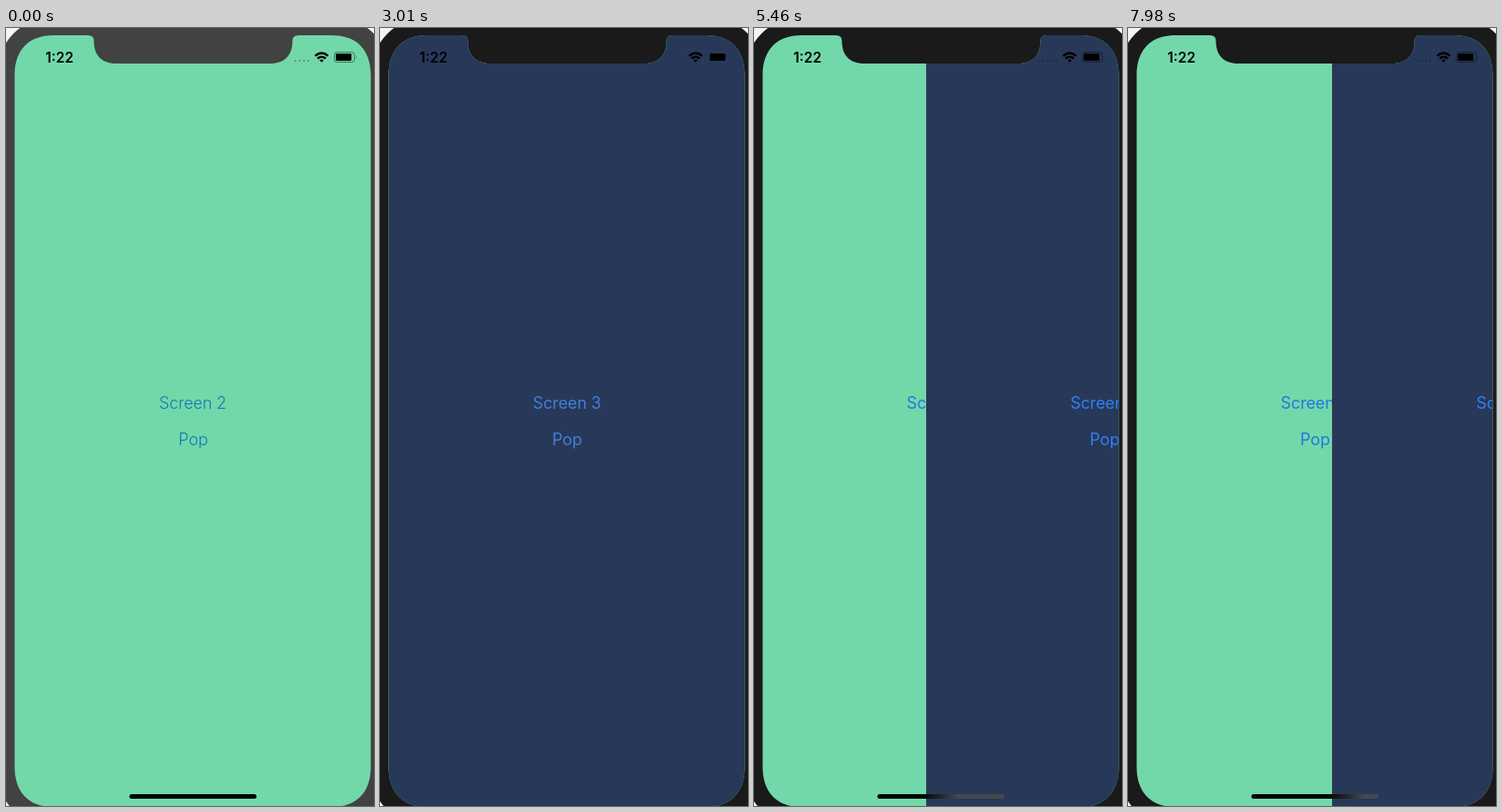
An HTML page for the animation above (8 s loop, 404 by 854 pixels).

```html
<!DOCTYPE html>
<html lang="en">
<head>
<meta charset="utf-8">
<title>Swipe between screens</title>
<style>
  html, body { margin: 0; width: 100%; height: 100%; overflow: hidden; background: #f4f4f4; }
  svg { display: block; width: 404px; height: 854px; }
  text { font-family: Inter, Roboto, sans-serif; }
  .label { font-size: 18px; letter-spacing: -.15px; text-anchor: middle; }
  #below { fill: #2478df; }
  #above { fill: #2f80f2; }
  #bezel { fill: #1a1a1a; }
  .rest #bezel { fill: #424242; }
  .rest #below { fill: #1878b4; font-weight: 300; }
  .dim #above { fill: #4080d8; }
  .dim #dots, .dim #bar { display: none; }
  .still #shell { display: none; }
</style>
</head>
<body>
<svg id="stage" viewBox="0 0 404 854">
  <defs>
    <clipPath id="screen">
      <path d="M9.5 52C9.5 24 25 8 52 8H90Q96.5 8 96.5 14C96.5 30 105 39 121 39H290C306 39 314.5 30 314.5 14Q314.5 8 321 8H358C385 8 400.5 24 400.5 52V811C400.5 839 385 855 358 855H52C25 855 9.5 839 9.5 811Z"/>
    </clipPath>
    <linearGradient id="shade" gradientUnits="userSpaceOnUse" x1="0" x2="42">
      <stop offset="0" stop-color="#000"/>
      <stop offset="1" stop-color="#48484b"/>
    </linearGradient>
  </defs>
  <rect id="bezel" x="-10" y="-12" width="432" height="889" rx="62"/>
  <g clip-path="url(#screen)">
    <rect width="404" height="854" fill="#72d8a9"/>
    <g id="below" class="label">
      <text x="205" y="418">Screen 2</text>
      <text x="205.5" y="457.5">Pop</text>
    </g>
    <g id="card">
      <rect x="9.5" width="392" height="854" fill="#283858"/>
      <g id="above" class="label">
        <text x="205.3" y="418">Screen 3</text>
        <text x="205.5" y="457.5">Pop</text>
      </g>
    </g>
  </g>
  <text x="43.3" y="37.5" font-size="15.5" font-weight="600">1:22</text>
  <g id="dots" fill="#000" opacity=".35">
    <circle cx="317.5" cy="36" r="1"/><circle cx="322.3" cy="36" r="1"/>
    <circle cx="327.1" cy="36" r="1"/><circle cx="331.9" cy="36" r="1"/>
  </g>
  <g fill="none" stroke="#000" stroke-width="2.3">
    <path d="M339.4 30.6Q346.5 24.4 353.6 30.6"/>
    <path d="M342 33.5Q346.5 29.7 351 33.5"/>
  </g>
  <path d="M344.2 35.3Q346.5 33.6 348.8 35.3L346.5 37.7Z"/>
  <g id="shell">
    <rect x="360.5" y="26.5" width="22" height="11" rx="3" fill="none" stroke="#000" stroke-opacity=".45"/>
    <path d="M384 30Q385.5 32 384 34Z" opacity=".5"/>
  </g>
  <rect x="362" y="28" width="17.3" height="8" rx="1.4"/>
  <rect id="bar" x="135.5" y="841" width="139.5" height="5" rx="2.5" fill="url(#shade)"/>
</svg>
<script>
  const LOOP = 8000, TICK = 70, WIDTH = 392, LEFT = 9.5;
  const $ = id => document.getElementById(id);
  const stage = $('stage'), card = $('card'), below = $('below'), shade = $('shade');

  // Finger drag: [time, offset]
  const drag = [[3080, 0], [3150, 0], [4060, 144.5], [4760, 225], [5460, 179.5],
                [6440, 30], [6650, 0], [7350, 0], [7980, 214.5], [8300, 320]];

  const clamp = v => Math.min(1, Math.max(0, v));
  const ease = v => v * v * (3 - 2 * v);

  // Tangent that flattens at turning points
  function slope(i) {
    const a = drag[i - 1], b = drag[i], c = drag[i + 1];
    if (!a || !c || (b[1] - a[1]) * (c[1] - b[1]) <= 0) return 0;
    return (c[1] - a[1]) / (c[0] - a[0]);
  }

  function dragged(t) {
    const i = drag.findIndex(p => p[0] > t) - 1;
    const [t0, v0] = drag[i], [t1, v1] = drag[i + 1];
    const d = t1 - t0, u = (t - t0) / d, w = 1 - u;
    return v0 + (v1 - v0) * ease(u) + d * u * w * (slope(i) * w - slope(i + 1) * u);
  }

  function offset(t) {
    if (t < drag[0][0]) return WIDTH * (1 - ease(clamp((t - 1346) / 500)));
    return dragged(t);
  }

  function draw(now) {
    const t = Math.floor(now % LOOP / TICK) * TICK;
    const x = offset(t);
    const press = clamp((t - 1050) / 150) - clamp((t - 1300) / 250);
    card.setAttribute('transform', `translate(${x} 0)`);
    shade.setAttribute('gradientTransform', `translate(${x + LEFT - 6} 0)`);
    below.style.opacity = 1 - .8 * press;
    stage.classList.toggle('rest', t < 1120);
    stage.classList.toggle('dim', x < 60);
    stage.classList.toggle('still', x < 1);
    requestAnimationFrame(draw);
  }

  draw(0);
</script>
</body>
</html>
```
